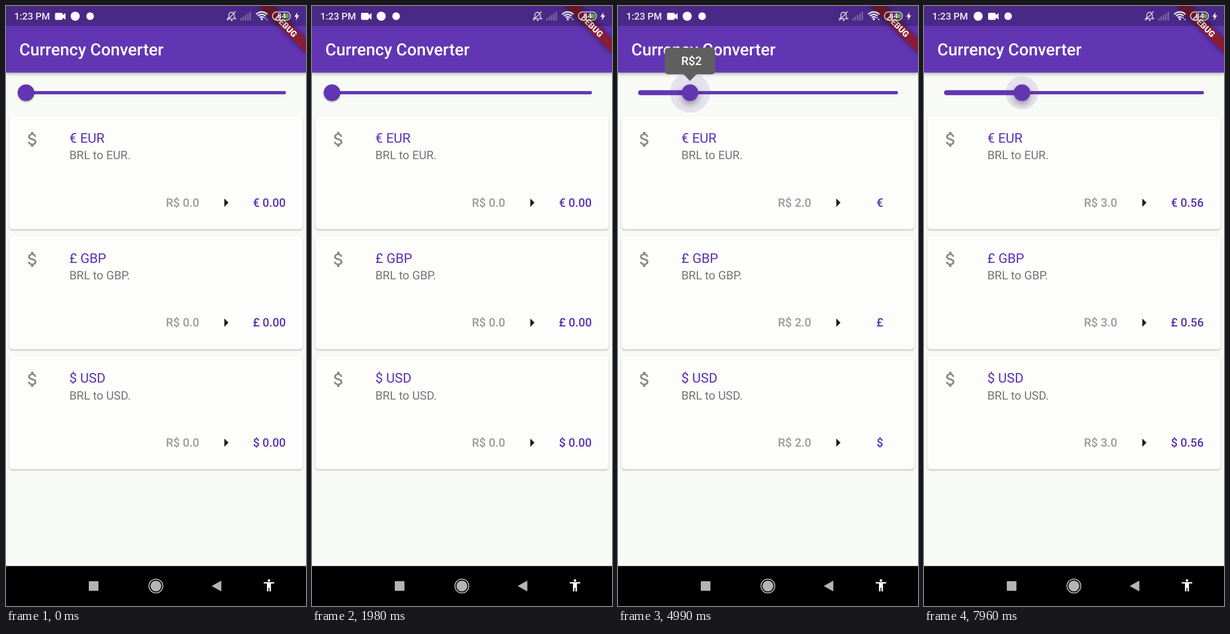
An HTML page with a canvas for the animation above (8 s loop, 529 by 1058 pixels).

```html
<!DOCTYPE html>
<html lang="en">
<head>
<meta charset="utf-8">
<title>Currency Converter</title>
<style>
html, body { margin: 0; width: 100%; height: 100%; overflow: hidden; background: #f8faf6; }
canvas { display: block; width: 100vw; height: 100vh; }
</style>
</head>
<body>
<canvas id="stage" width="529" height="1058"></canvas>
<script>
const ctx = document.getElementById('stage').getContext('2d');
ctx.textRendering = 'geometricPrecision';
const W = 529, H = 1058, LOOP = 8000, DP = W / 360;
const PURPLE = '#6236b3', RATE = 0.1867;
const STATUS_H = 24 * DP, BAR_H = 80 * DP, NAV_Y = H - 48 * DP;
const TRACK_X = 24 * DP, TRACK_Y = 104 * DP, STEP = 31.2 * DP;
const CARD_Y = 132 * DP;

// [time, value]
const thumbKeys = [[0, 0], [2240, 1], [2480, 2], [2740, 1], [4700, 2], [7060, 3]];
const amountKeys = [[0, 0], [2280, 1], [2520, 2], [2890, 1], [4740, 2], [7100, 3]];
// [start, end]
const loads = [[2280, 3400], [4740, 5400], [7100, 7600]];
const presses = [[2240, 3500], [4700, 6010], [7060, 7915]];

const dollarIcon = new Path2D('M11.8 10.9c-2.27-.59-3-1.2-3-2.15 0-1.09 1.01-1.85 2.7-1.85 1.78 0 2.44.85 2.5 2.1h2.21c-.07-1.72-1.12-3.3-3.21-3.81V3h-3v2.16c-1.94.42-3.5 1.68-3.5 3.61 0 2.31 1.91 3.46 4.7 4.13 2.5.6 3 1.48 3 2.41 0 .69-.49 1.79-2.7 1.79-2.06 0-2.87-.92-2.98-2.1h-2.2c.12 2.19 1.76 3.42 3.68 3.83V21h3v-2.15c1.95-.37 3.5-1.5 3.5-3.55 0-2.84-2.43-3.81-4.7-4.4z');

const clamp = x => Math.max(0, Math.min(1, x));

// cubic-bezier(.4, 0, .2, 1)
function ease(x) {
  x = clamp(x);
  let lo = 0, hi = 1;
  for (let i = 0; i < 20; i++) {
    const s = (lo + hi) / 2, r = 1 - s;
    if (1.2 * r * r * s + 0.6 * r * s * s + s * s * s < x) lo = s; else hi = s;
  }
  return lo * lo * (3 - 2 * lo);
}

const valueAt = (keys, t) => keys.filter(k => k[0] <= t).pop()[1];
const pulse = (t, a, b, d) => Math.min(ease((t - a) / d), ease((b + d - t) / d));
const within = (t, spans) => spans.some(([a, b]) => t >= a && t < b);

function thumbAt(t) {
  let pos = 0;
  for (let i = 1; i < thumbKeys.length; i++) {
    pos += (thumbKeys[i][1] - thumbKeys[i - 1][1]) * ease((t - thumbKeys[i][0]) / 75);
  }
  return pos;
}

function rect(x, y, w, h, color, r = 0) {
  ctx.fillStyle = color;
  ctx.beginPath();
  ctx.roundRect(x, y, w, h, r);
  ctx.fill();
}

function circle(x, y, r, color) {
  ctx.fillStyle = color;
  ctx.beginPath();
  ctx.arc(x, y, r, 0, Math.PI * 2);
  ctx.fill();
}

function poly(color, ...points) {
  ctx.fillStyle = color;
  ctx.beginPath();
  points.forEach(([x, y]) => ctx.lineTo(x, y));
  ctx.closePath();
  ctx.fill();
}

function text(str, x, y, size, color, weight = 400, align = 'left') {
  ctx.font = `${weight} ${size}px Roboto, sans-serif`;
  ctx.textAlign = align;
  ctx.fillStyle = color;
  ctx.fillText(str, x, y);
}

function withShadow(color, blur, dy, draw) {
  ctx.save();
  ctx.shadowColor = color;
  ctx.shadowBlur = blur;
  ctx.shadowOffsetY = dy;
  draw();
  ctx.restore();
}

function drawSlider(pos, press) {
  const x = TRACK_X + pos * STEP;
  rect(x, TRACK_Y - 2 * DP, TRACK_X + 10 * STEP - x, 4 * DP, PURPLE, 2 * DP);
  if (pos > 0) rect(TRACK_X, TRACK_Y - 3 * DP, x - TRACK_X, 6 * DP, PURPLE, 3 * DP);
  if (press > 0) circle(x, TRACK_Y, 24 * DP * press, 'rgba(98,54,179,.13)');
  withShadow('rgba(0,0,0,.34)', 3 + 9 * press, 1.5 + 4.5 * press,
    () => circle(x, TRACK_Y, 10 * DP, PURPLE));
}

function drawIndicator(pos, label, scale) {
  if (scale <= 0.01) return;
  ctx.save();
  ctx.translate(TRACK_X + pos * STEP, TRACK_Y - 14 * DP);
  ctx.scale(scale, scale);
  rect(-44.4, -40 * DP, 88.8, 32 * DP, '#5f5f5f', 4 * DP);
  poly('#5f5f5f', [-8 * DP, -8 * DP - 0.5], [8 * DP, -8 * DP - 0.5], [0, 0]);
  text(label, 0, -28.3, 14 * DP, '#fff', 500, 'center');
  ctx.restore();
}

function drawCard(i, sign, code, amount, loading) {
  ctx.save();
  ctx.translate(0, CARD_Y + i * 144 * DP);
  withShadow('rgba(0,0,0,.26)', 3, DP,
    () => rect(4 * DP, 0, 352 * DP, 136 * DP, '#fdfdfc', 4 * DP));
  text(`${sign} ${code}`, 76 * DP, 32 * DP, 16 * DP, '#5b30ae');
  text(`BRL to ${code}.`, 76 * DP, 52 * DP, 14 * DP, '#747474');
  const mid = 104 * DP, base = mid + 7;
  text(`R$ ${amount.toFixed(1)}`, 311.4, base, 14 * DP, '#9a9a9a', 500, 'center');
  const result = loading ? '' : (amount * RATE).toFixed(2);
  text(`${sign} ${result}`, 464.3, base, 14 * DP, '#5b30ae', 500, 'center');
  poly('#202020', [385, mid - 5 * DP], [385 + 5 * DP, mid], [385, mid + 5 * DP]);
  ctx.translate(20 * DP, 16 * DP);
  ctx.scale(DP, DP);
  ctx.fillStyle = '#8a8a8a';
  ctx.fill(dollarIcon);
  ctx.restore();
}

function drawAppBar() {
  withShadow('rgba(0,0,0,.32)', 7, 2.5, () => rect(0, 0, W, BAR_H, PURPLE));
  text('Currency Converter', 16 * DP, 86.5, 20 * DP, '#fff', 500);
}

function drawBanner() {
  ctx.save();
  ctx.translate(W, 0);
  ctx.rotate(Math.PI / 4);
  withShadow('rgba(0,0,0,.5)', 10, 0,
    () => rect(-40 * DP, 28 * DP, 80 * DP, 12 * DP, '#881d38'));
  text('DEBUG', 0, 55.1, 10.2 * DP, '#fff', 900, 'center');
  ctx.restore();
}

function drawCamera(x) {
  rect(x, 12, 13.5, 12.5, '#fff', 2);
  poly('#fff', [x + 12, 17], [x + 18.5, 12.5], [x + 18.5, 24], [x + 12, 19.5]);
}

function drawBell() {
  ctx.strokeStyle = '#d9d2e4';
  ctx.lineWidth = 1.6;
  ctx.beginPath();
  ctx.moveTo(390.5, 22.5);
  ctx.lineTo(393, 20);
  ctx.lineTo(393, 16);
  ctx.bezierCurveTo(393, 9.5, 402.5, 9.5, 402.5, 16);
  ctx.lineTo(402.5, 20);
  ctx.lineTo(405, 22.5);
  ctx.closePath();
  ctx.moveTo(390, 25.5);
  ctx.lineTo(405, 9.5);
  ctx.stroke();
  circle(398, 25, 1.6, '#d9d2e4');
}

function drawWifi() {
  ctx.strokeStyle = '#eee9f4';
  ctx.lineWidth = 2.5;
  for (const r of [5, 9.2, 13.4]) {
    ctx.beginPath();
    ctx.arc(451, 24, r, -Math.PI * 0.76, -Math.PI * 0.24);
    ctx.stroke();
  }
  circle(451, 23.3, 2, '#eee9f4');
  poly('#eee9f4', [455.5, 22], [457, 19.5], [458.5, 22]);
  poly('#eee9f4', [458.5, 23], [460, 25.5], [461.5, 23]);
}

function drawStatus(swapped) {
  rect(0, 0, W, STATUS_H, 'rgba(0,0,0,.25)');
  text('1:23 PM', 14.5, 24.2, 16.9, '#f3f0f7', 500);
  drawCamera(swapped ? 113 : 86.5);
  circle(swapped ? 95.5 : 122, 18, 8, '#fff');
  circle(148.3, 18, 6.7, '#fff');
  drawBell();
  for (let i = 0; i < 5; i++) {
    rect(413 + i * 4.1, 21.5 - i * 2.8, 2.6, 4 + i * 2.8, '#7d669f');
  }
  drawWifi();
  ctx.strokeStyle = '#e3dce9';
  ctx.lineWidth = 1.5;
  ctx.beginPath();
  ctx.roundRect(470, 10.5, 31.5, 14.5, 7);
  ctx.stroke();
  circle(495, 17.7, 4.2, '#55b52d');
  text('84', 486, 22.4, 13, '#e9e2ee', 700, 'center');
  poly('#f3f0f7', [514, 11], [508.5, 19], [512, 19], [511, 25.5], [517, 16.5], [513.3, 16.5]);
}

function drawNav() {
  rect(0, NAV_Y, W, H - NAV_Y, '#000');
  const gray = '#b4b4b4', y = NAV_Y + 24 * DP;
  rect(146, y - 8.5, 17, 17, gray, 1);
  circle(264.3, y, 9.6, gray);
  ctx.strokeStyle = gray;
  ctx.lineWidth = 1.8;
  ctx.beginPath();
  ctx.arc(264.3, y, 12.2, 0, Math.PI * 2);
  ctx.stroke();
  poly(gray, [362.7, y], [379.7, y - 9.5], [379.7, y + 9.5]);
  circle(463.7, y - 9.8, 2.3, '#fff');
  rect(454.5, y - 6.8, 18.5, 2.4, '#fff');
  rect(460.2, y - 6.8, 7, 10, '#fff');
  rect(460.2, y + 2.2, 2.6, 7.3, '#fff');
  rect(464.6, y + 2.2, 2.6, 7.3, '#fff');
}

function draw(t) {
  const pos = thumbAt(t);
  const press = Math.max(...presses.map(([a, b]) => pulse(t, a, b, 100)));
  const tip = Math.max(...presses.map(([a, b]) => pulse(t, a, b - 110, 100)));
  const amount = valueAt(amountKeys, t);
  const loading = within(t, loads);

  rect(0, 0, W, H, '#f8faf6');
  drawSlider(pos, press);
  [['€', 'EUR'], ['£', 'GBP'], ['$', 'USD']].forEach(([sign, code], i) =>
    drawCard(i, sign, code, amount, loading));
  drawAppBar();
  drawIndicator(pos, ` R$${valueAt(thumbKeys, t)}`, tip);
  drawBanner();
  drawStatus(t >= 5500);
  drawNav();
}

const start = performance.now();
function tick() {
  draw((performance.now() - start) % LOOP);
  requestAnimationFrame(tick);
}
tick();
</script>
</body>
</html>
```
